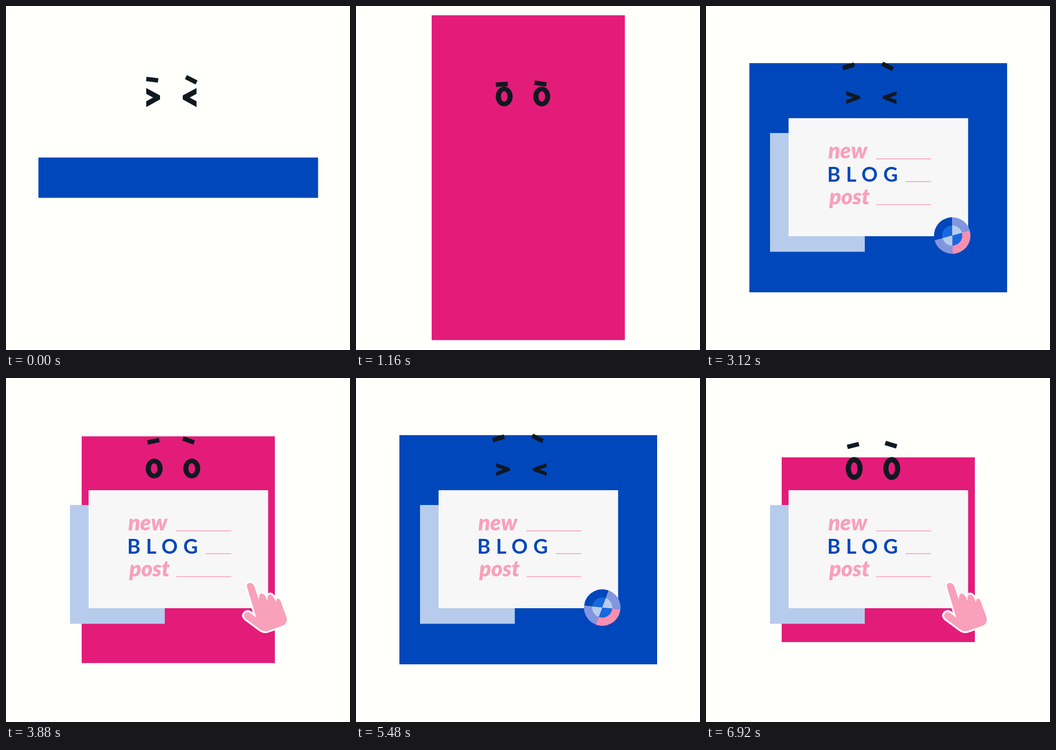
Recreate the animation shown at these times as an HTML page with a canvas. Size 650 by 650 pixels, loop 6.96 s.

```html
<!DOCTYPE html>
<html lang="en">
<head>
<meta charset="utf-8">
<title>New blog post</title>
<style>
html, body { margin: 0; width: 100%; height: 100%; overflow: hidden; background: #fffffc; }
canvas { display: block; }
</style>
</head>
<body>
<canvas id="stage" width="650" height="650"></canvas>
<script>
const ctx = document.getElementById('stage').getContext('2d');
const SCENE = 1160, STEP = 40, RAD = Math.PI / 180;
const PAPER = '#fffffc', CARD = '#f7f7f7', INK = '#101820';
const BLUE = '#0047bb', PINK = '#e31c79', ROSE = '#f9a0bb', SKY = '#b7ccec';
const BRIGHT = '#1769e0', PERIWINKLE = '#8196df', CORAL = '#f78fb0';

const ramp = (t, from, to) => Math.min(1, Math.max(0, (t - from) / (to - from)));
const lerp = (a, b, p) => a + (b - a) * p;
const blend = (a, b, p) => `rgb(${a.map((v, i) => Math.round(lerp(v, b[i], p)))})`;

function rect(x, y, w, h, color) {
  ctx.fillStyle = color;
  ctx.fillRect(x, y, w, h);
}

// A backdrop centred across the stage
function backdrop(width, top, bottom, color) {
  rect(325.5 - width / 2, top, width, bottom - top, color);
}

function brow(x, y, angle) {
  ctx.save();
  ctx.translate(x, y);
  ctx.rotate(angle * RAD);
  rect(-11.3, -4.2, 22.6, 8.4, INK);
  ctx.restore();
}

function words(t) {
  const p = ramp(t, 240, 360);
  const soft = blend([118, 134, 204], [249, 160, 187], p);
  ctx.globalAlpha = ramp(t, 120, 210);
  ctx.fillStyle = soft;
  ctx.font = 'italic 900 41px Raleway, Lato, sans-serif';
  ctx.letterSpacing = '0px';
  ctx.fillText('new', 231, 288);
  ctx.fillText('post', 233, 375);
  rect(322, 288, 103.5, 1.6, soft);
  rect(377, 331, 48.5, 1.6, soft);
  rect(322, 374.6, 103.5, 1.6, soft);
  ctx.fillStyle = blend([178, 156, 206], [0, 71, 187], p);
  ctx.font = 'bold 38px Raleway, Lato, sans-serif';
  ctx.letterSpacing = '10.5px';
  ctx.fillText('BLOG', 229, 332);
  ctx.globalAlpha = 1;
}

function sector(x, y, r, from, span, color) {
  ctx.beginPath();
  ctx.moveTo(x, y);
  ctx.arc(x, y, r, from * RAD, (from + span) * RAD);
  ctx.fillStyle = color;
  ctx.fill();
}

function wheel(x, turn) {
  [BLUE, PERIWINKLE, CORAL, PERIWINKLE].forEach((color, i) => {
    const span = i % 2 ? 75 : 105;
    sector(x, 433.7, 34.5, turn, span, color);
    sector(x, 433.7, 19, turn, span, i % 2 ? SKY : BRIGHT);
    turn += span;
  });
}

const handShape = new Path2D(`M456 397 Q453 389 460 387 Q466 387 469 393 L478 420
  Q477 408 483 407 Q489 407 494 421 Q493 410 499 409 Q505 409 510 424
  Q510 416 515 417 Q518 418 519 422 L530 452 Q533 463 523 468 L494 478
  Q487 480 480 475 L453 455 Q447 449 452 444 Q457 440 463 445 L473 453 Z`);

function hand(dx) {
  ctx.save();
  ctx.translate(dx, 0);
  ctx.lineJoin = 'round';
  ctx.lineWidth = 7;
  ctx.strokeStyle = '#fff';
  ctx.stroke(handShape);
  ctx.fillStyle = ROSE;
  ctx.fill(handShape);
  ctx.restore();
}

const chevron = new Path2D('M0 -18 L26 -4 V3.5 L0 18 V7 L13 0 L0 -7 Z');

function squint(x, side, scale) {
  ctx.save();
  ctx.translate(x, 173);
  ctx.scale(side, scale);
  ctx.fillStyle = INK;
  ctx.fill(chevron);
  ctx.restore();
}

function ring(x, scale) {
  ctx.beginPath();
  ctx.ellipse(x, 171, 16, 18.7 * scale, 0, 0, 7);
  ctx.closePath();
  ctx.moveTo(x + 6.3, 171);
  ctx.ellipse(x, 171, 6.3, 10 * scale, 0, 0, 7);
  ctx.fillStyle = INK;
  ctx.fill('evenodd');
}

// Eyes narrow while the brows climb
function blueFace(t) {
  const scale = 1 - 0.33 * ramp(t, 400, 800);
  const up = ramp(t, 0, 800), drift = 7 * up * up, y = 139.3 - 25.3 * up;
  squint(265, 1, scale);
  squint(360, -1, scale);
  brow(276.3 - drift, y, 7 - 23 * up);
  brow(350 - drift, y, 27 - up);
}

// Brows jump up and sink back while the eyes widen
function pinkFace(t) {
  const scale = 1 + 0.16 * ramp(t, 640, 960);
  const up = ramp(t, 0, 520), down = ramp(t, 520, 1120), y = 148 - 37 * up + 16.5 * down;
  ring(280, scale);
  ring(351, scale);
  brow(275.5 + 5 * up * up - 2.5 * down, y, -4 - 10 * up);
  brow(348.5 - 6 * up * up + 7 * down, y - 1.5, 8 + 15 * up - 6 * down);
}

function draw(now) {
  const time = Math.floor(now / STEP) * STEP;
  const t = time % SCENE, blue = Math.floor(time / SCENE) % 2 === 0;
  rect(0, 0, 650, 650, PAPER);

  const p = blue ? ramp(t, 80, 360) : ramp(t, 120, 520);
  if (blue) backdrop(lerp(528.4, 487, p), lerp(286.3, 108, p), lerp(362.5, 541, p), BLUE);
  else backdrop(365, lerp(17.5, 150, p), lerp(631.3, 499, p), PINK);

  // Everything else sweeps in from the left at one speed
  const sweep = 1.875 * (t - STEP);
  rect(Math.min(121, sweep - 179), 240, 179, 224.4, SKY);
  const edge = Math.min(495.3, sweep - 4.7);
  if (edge > 156) rect(156, 212, edge - 156, 223, CARD);
  words(t);

  if (blue) {
    wheel(lerp(-46, 465.3, ramp(t, 40, 360)), 165 + (t - 800) * 0.52);
    blueFace(t);
  } else {
    hand(edge - 495.3);
    pinkFace(t);
  }
}

const start = performance.now();
function tick() {
  draw(performance.now() - start);
  requestAnimationFrame(tick);
}
tick();
</script>
</body>
</html>
```
